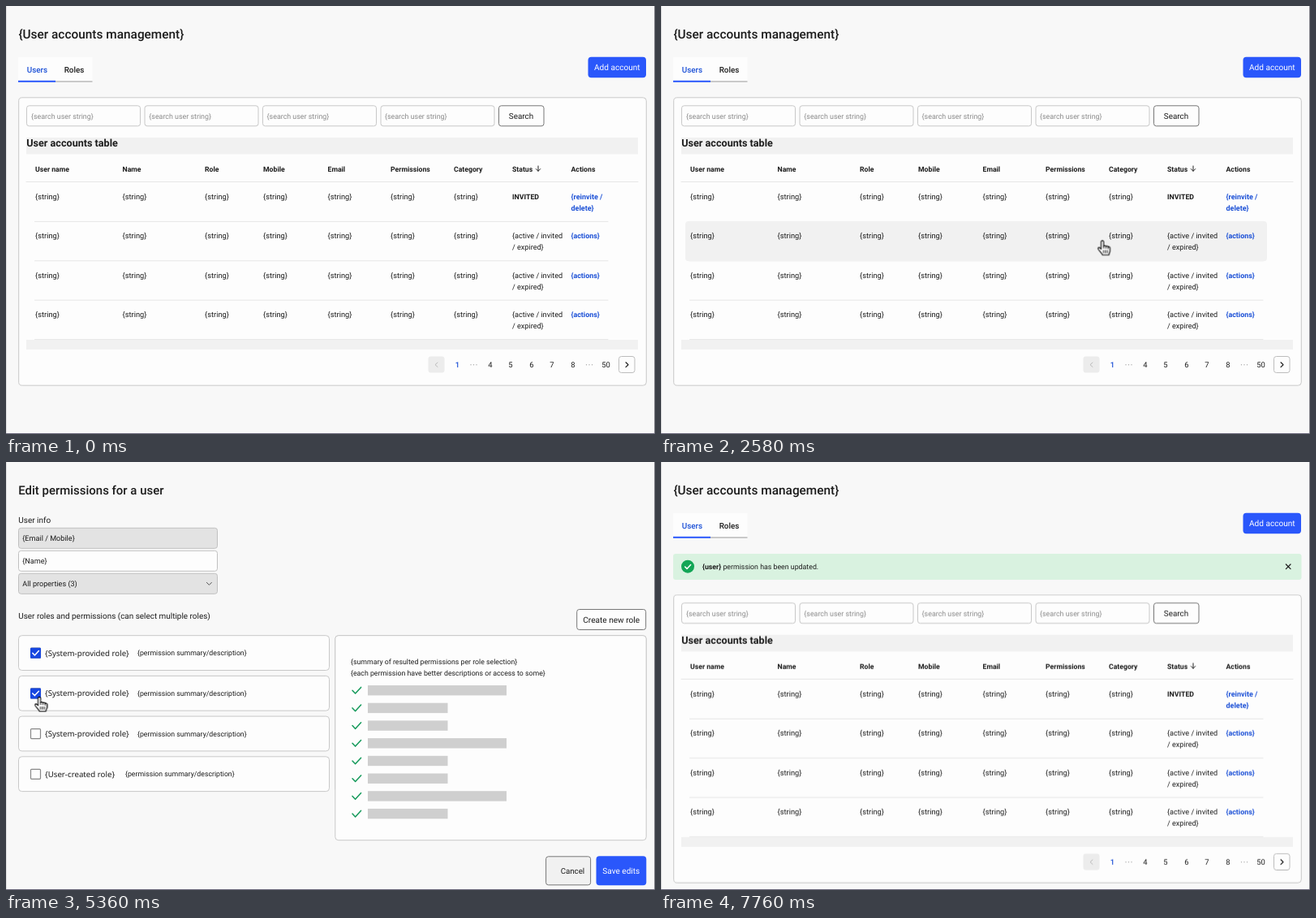
Animation of 800x527 px, one loop 8 s. Source, as an HTML page:

```html
<!DOCTYPE html>
<html lang="en">
<head>
<meta charset="utf-8">
<title>User accounts management</title>
<style>
html, body { margin: 0; width: 100%; height: 100%; overflow: hidden; background: #f8f8f8; }
svg { display: block; width: 800px; height: 527px; }
text { font-family: Roboto, "Liberation Sans", sans-serif; fill: #1c1c1c; text-rendering: geometricPrecision; white-space: pre; }
.h { font-weight: 500; }
.b { font-weight: 700; }
.role { font-family: "Noto Sans", sans-serif; font-weight: 500; }
.blue { fill: #1a4fd6; }
.hint { fill: #8a8a8a; }
.white { fill: #fff; }
.line { fill: none; stroke-linecap: round; stroke-linejoin: round; }

/* One 8 s timeline: 1% = 80 ms */
#list, #edit, #row, #body, #toast, #more, #ticked, #actions, #arrow, #hand { animation: 8s step-end infinite; }
#list { animation-name: list; }
#edit { animation-name: edit; }
#row { animation-name: row; }
#body { animation-name: body; }
#toast { animation-name: toast; }
#more, #ticked { animation-name: ticked; }
#actions { animation-name: actions; }
#arrow { animation-name: arrow; }
#hand { animation-name: hand; }
#cursor { animation: move 8s linear infinite; }

@keyframes list { 0% { opacity: 1 } 35% { opacity: 0 } 78.75%, 100% { opacity: 1 } }
@keyframes edit { 0% { opacity: 0 } 35% { opacity: 1 } 78.75%, 100% { opacity: 0 } }
@keyframes row { 0% { opacity: 0 } 22.25% { opacity: 1 } 35%, 100% { opacity: 0 } }
@keyframes body { 0% { transform: none } 78.75%, 100% { transform: translateY(50.8px) } }
@keyframes toast { 0% { opacity: 0 } 78.75%, 100% { opacity: 1 } }
@keyframes ticked { 0% { opacity: 0 } 62.875%, 100% { opacity: 1 } }
@keyframes actions { 0% { transform: none } 62.875%, 100% { transform: translateY(60px) } }
@keyframes arrow {
  0% { opacity: 0 } 11% { opacity: 1 } 22.25% { opacity: 0 }
  35% { opacity: 1 } 51.25% { opacity: 0 } 68.5% { opacity: 1 }
  74.5% { opacity: 0 } 78.75% { opacity: 1 } 87.5%, 100% { opacity: 0 }
}
@keyframes hand {
  0% { opacity: 0 } 22.25% { opacity: 1 } 35% { opacity: 0 }
  51.25% { opacity: 1 } 68.5% { opacity: 0 } 74.5% { opacity: 1 } 78.75%, 100% { opacity: 0 }
}
@keyframes move {
  0%, 11% { transform: translate(797px, 526px); animation-timing-function: ease-in-out }
  21.25% { transform: translate(557.5px, 289px); animation-timing-function: ease-out }
  25%, 41.25% { transform: translate(544.5px, 289.5px); animation-timing-function: ease-in }
  48.875% { transform: translate(121.5px, 328px); animation-timing-function: ease-out }
  51.875%, 67.25% { transform: translate(41.5px, 290px); animation-timing-function: ease-in-out }
  75.75%, 100% { transform: translate(757px, 498px) }
}
</style>
</head>
<body>
<svg id="stage" viewBox="0 0 800 527"></svg>
<script>
const range = n => [...Array(n).keys()];
const each = (items, draw) => items.map(draw).join('');
const text = (x, y, size, str, cls = '', anchor = 'start') =>
  `<text x="${x}" y="${y}" font-size="${size}" class="${cls}" text-anchor="${anchor}">${str}</text>`;
const box = (x, y, w, h, fill, stroke = 'none', r = 0, sw = 1) =>
  `<rect x="${x}" y="${y}" width="${w}" height="${h}" rx="${r}" fill="${fill}" stroke="${stroke}" stroke-width="${sw}"/>`;
const line = (d, color, width = 1) =>
  `<path class="line" d="${d}" stroke="${color}" stroke-width="${width}"/>`;
const group = (id, content) => `<g id="${id}">${content}</g>`;

const BLUE = '#2a57fb', CARD = '#fdfdfd', EDGE = '#c8c8c8', BAND = '#f1f1f1';
const cols = [36, 143.5, 245, 317, 396.5, 474, 552, 624, 696.5];
const heads = ['User name', 'Name', 'Role', 'Mobile', 'Email', 'Permissions', 'Category', 'Status', 'Actions'];

function tableRow(i) {
  const y = 237.7 + i * 48.4;
  const status = i
    ? text(624, y, 9.1, '{active / invited') + text(624, y + 14, 9.1, '/ expired}')
    : text(624, y, 8.8, 'INVITED', 'b');
  const action = i
    ? text(696.5, y, 8.9, '{actions}', 'b blue')
    : text(696.5, y, 9, '{reinvite /', 'b blue') + text(696.5, y + 14, 9, 'delete}', 'b blue');
  return each(cols.slice(0, 7), x => text(x, y, 9.3, '{string}')) + status + action;
}

function pager() {
  const pages = [[597, 4], [622, 5], [648, 6], [673, 7], [699, 8], [739.5, 50]];
  return box(520.5, 431.5, 20, 20, '#ececec', 'none', 3)
    + line('M532 439l-3 2.7l3 2.7', '#bbb')
    + text(556.5, 445, 9.4, '1', 'h blue', 'middle')
    + each(pages, ([x, n]) => text(x, 445, 9.4, n, '', 'middle'))
    + each([576.5, 719], x => each([-3.5, 0, 3.5], d => `<circle cx="${x + d}" cy="441.7" r=".7" fill="#aaa"/>`))
    + box(755.5, 431.5, 19.5, 20, CARD, '#bdbdbd', 3)
    + line('M764 438.8l3 2.9l-3 2.9', '#222', 1.2);
}

function listPage() {
  const top = text(15.5, 39.5, 15.4, '{User accounts management}', 'h')
    + box(15, 63, 91.5, 30, CARD)
    + box(61, 92.3, 45.5, 1.4, '#b5b5b5') + box(15, 91.8, 46, 2, BLUE)
    + text(38.5, 82.3, 9.9, 'Users', 'h blue', 'middle') + text(84, 82.3, 9.9, 'Roles', 'h', 'middle')
    + box(717.5, 62.8, 71.5, 25.4, BLUE, 'none', 4)
    + text(753.3, 79.2, 10.1, 'Add account', 'white', 'middle');
  const toast = box(15, 113, 774.5, 32, '#d9f2e0', 'none', 3)
    + '<circle cx="33" cy="128.7" r="8" fill="#13a656"/>'
    + line('M29.6 129l2.4 2.4l4.6-4.8', '#fff', 1.5)
    + text(51, 131.8, 8.8, '<tspan class="b">{user}</tspan> permission has been updated.')
    + line('M770.4 126l5.6 5.6m0-5.6l-5.6 5.6', '#222', 1.3);
  const body = box(15.7, 112.8, 773.6, 354.4, CARD, EDGE, 4)
    + each(range(4), i => box(25.5 + i * 145.5, 122.8, 140, 25, CARD, EDGE, 3)
      + text(31 + i * 145.3, 138.6, 8.9, '{search user string}', 'hint'))
    + box(607.5, 122.8, 55.5, 25, CARD, '#777', 3)
    + text(635, 139.2, 9.9, 'Search', '', 'middle')
    + box(25, 162, 754, 20.5, BAND) + text(25.3, 173, 12.6, 'User accounts table', 'b')
    + each(range(9), i => text(cols[i], 203.5, 8.7, heads[i], 'b'))
    + line('M656 197v6.3m-2.7-2.7l2.7 2.7l2.7-2.7', '#222')
    + line('M25 216.5H779', '#e6e6e6')
    + each(range(4), i => line(`M35.5 ${265.4 + i * 48.4}H742`, '#e6e6e6'))
    + group('row', box(30, 265, 717, 49.3, BAND, 'none', 4))
    + each(range(4), tableRow)
    + box(25, 411, 754, 12, BAND) + pager();
  return top + group('toast', toast) + group('body', body);
}

const tick = y => box(30, y - 6.5, 13, 13, '#1747e0', 'none', 1)
  + line(`M32.8 ${y}l2.6 2.7l5-5.4`, '#fff', 1.5);

function roleCard(i) {
  const y = 213.7 + i * 49.7, mid = y + 21.5;
  return box(15.5, y, 383, 42.8, CARD, EDGE, 4)
    + box(30.5, mid - 6, 12, 12, CARD, '#888', 1, 1.2)
    + text(48, mid + 3.3, 9.7, i < 3 ? '{System-provided role}' : '{User-created role}', 'role')
    + text(i < 3 ? 162 : 147, mid + 3, 8.72, '{permission summary/description}');
}

function permission(i) {
  const y = 281.2 + i * 21.7;
  return line(`M427 ${y}l3.6 3.8l7-7.6`, '#159a5b', 1.5)
    + box(446, y - 6.2, i % 3 ? 98.5 : 171, 12.4, '#cfcfcf');
}

function editPage() {
  const field = (y, label, fill) => box(15.5, y, 245, 25, fill, '#c0c0c0', 3) + text(20.3, y + 15.7, 9.1, label);
  const panel = h => box(405.8, 213.7, 383.4, h, CARD, EDGE, 4);
  return text(15.3, 39.5, 14.95, 'Edit permissions for a user', 'h')
    + text(15.3, 74.5, 10, 'User info')
    + field(81.3, '{Email / Mobile}', '#e3e3e3')
    + field(109.3, '{Name}', CARD)
    + field(137.3, 'All properties (3)', '#e3e3e3')
    + line('M247.4 148.4l3 3l3-3', '#555')
    + text(15.3, 193, 9.94, 'User roles and permissions (can select multiple roles)')
    + box(703.7, 181.5, 85, 25, CARD, '#777', 3)
    + text(746.2, 197.8, 10.1, 'Create new role', '', 'middle')
    + each(range(4), roleCard) + tick(235.2) + group('ticked', tick(284.9))
    + panel(192.4)
    + group('more', panel(252) + each([4, 5, 6, 7], permission))
    + text(425, 249, 8.76, '{summary of resulted permissions per role selection}')
    + text(425, 263, 8.76, '{each permission have better descriptions or access to some}')
    + each(range(4), permission)
    + group('actions', box(665.6, 425.8, 55, 35, '#f1f1f1', '#777', 3)
      + text(683.7, 446.9, 9.7, 'Cancel')
      + box(727.5, 425.3, 61.8, 36, BLUE, 'none', 4)
      + text(758.3, 446.9, 10.05, 'Save edits', 'white', 'middle'));
}

const cursor = group('arrow',
    '<path d="M0 0V14.2L3.2 11.2L5.7 16.8L8.2 15.7L5.8 10.3H10Z" stroke="#fff" stroke-width="1.4" paint-order="stroke"/>')
  + group('hand',
    '<path fill="#fff" stroke="#000" stroke-width="1.1" stroke-linejoin="round" d="M-2 10V1a1.6 1.6 0 0 1 3.2 0V6.5c0-1.4 2.6-1.4 2.8.3c.4-1.2 2.6-1 2.7.6c.6-1 2.3-.6 2.3 1V12c0 2-1.3 3-1.3 5H-.3C-.8 15-5.6 10.8-5.8 9.2c0-1.4 1.6-1.8 2.4-.8Z"/>'
    + line('M1.2 6.5v2.3M4 6.8v2.2M6.7 7.4v2M1 11.5v3M3.4 11.5v3M5.8 11.5v3', '#000', .9));

document.getElementById('stage').innerHTML =
  box(0, 0, 800, 527, '#f8f8f8')
  + group('list', listPage()) + group('edit', editPage())
  + box(0, 0, 1, 527, '#dedee0') + box(799, 0, 1, 527, '#85858d') + box(0, 526, 800, 1, '#6c6a7c')
  + group('cursor', cursor);
</script>
</body>
</html>
```
